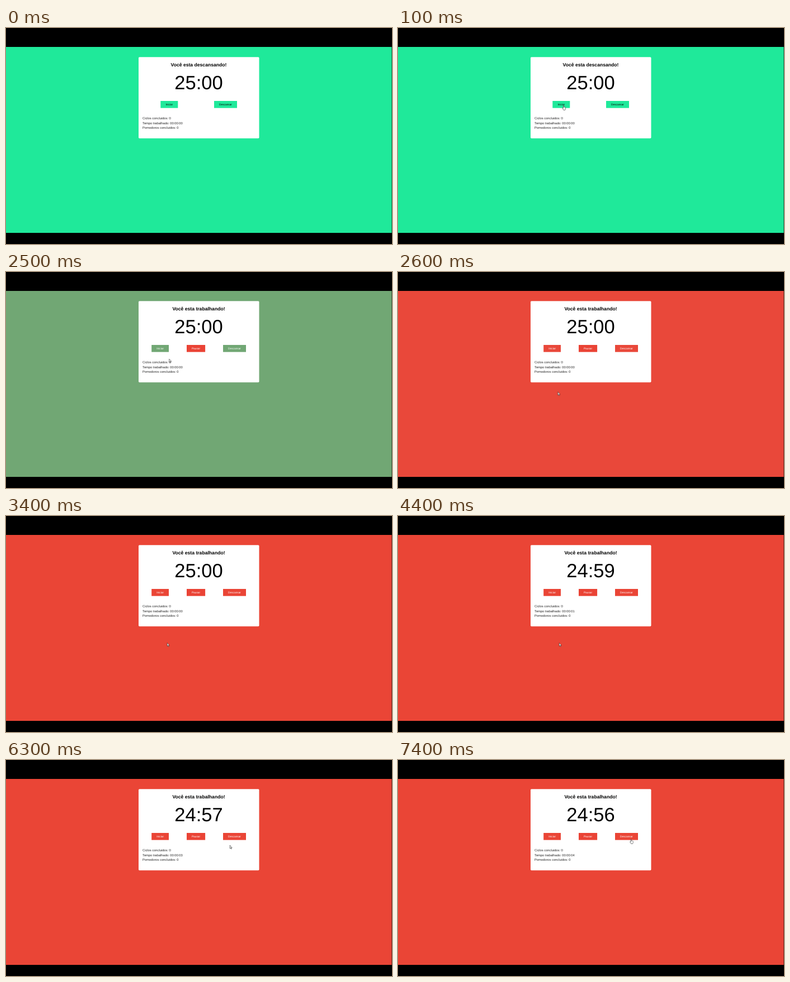
These frames come from a looping animation (690 by 388 pixels, 8 s). An HTML page:

```html
<!DOCTYPE html>
<html lang="pt-BR">
<head>
<meta charset="utf-8">
<title>Pomodoro</title>
<style>
  html, body { margin: 0; width: 100%; height: 100%; overflow: hidden; background: #000; }
  svg { display: block; width: 690px; height: 388px; }
  text { font-family: "Liberation Sans", Arial, sans-serif; text-rendering: geometricPrecision; }
  .mid { text-anchor: middle; }
  .title { font-size: 8.62px; font-weight: bold; }
  .clock { font-size: 34.5px; }
  .stats { font-size: 5.75px; fill: #222; }
  .label { font-size: 4.8px; }
  .work .label { fill: #fff; }
  .red { fill: #ea4335; }

  .theme, .rest, .work, .pointer, .arrow, .hand { animation: theme 8s step-end infinite; }
  .rest { animation-name: rest; }
  .work { animation-name: work; }
  .pointer { animation-name: move; }
  .arrow { animation-name: arrow; }
  .hand { animation-name: hand; }

  @keyframes theme {
    0% { fill: #1fe99a; }
    30% { fill: #29e097; }
    31.25% { fill: #71a774; }
    32.5% { fill: #e9483a; }
    33.75%, 100% { fill: #ea4536; }
  }
  @keyframes rest { 0% { visibility: visible; } 30%, 100% { visibility: hidden; } }
  @keyframes work { 0% { visibility: hidden; } 30%, 100% { visibility: visible; } }
  @keyframes arrow {
    0% { visibility: hidden; }
    30% { visibility: visible; }
    85%, 100% { visibility: hidden; }
  }
  @keyframes hand {
    0% { visibility: hidden; }
    1.25% { visibility: visible; }
    30% { visibility: hidden; }
    85%, 100% { visibility: visible; }
  }
  @keyframes move {
    0% { transform: translate(296px, 139px); }
    31.25% { transform: translate(291.5px, 156px); }
    32.5% { transform: translate(285.6px, 215.2px); }
    33.75% { transform: translate(287px, 225px); }
    35% { transform: translate(288px, 227.7px); }
    70% { transform: translate(292px, 225px); }
    71.25% { transform: translate(303px, 218px); }
    72.5% { transform: translate(318px, 208px); }
    73.75% { transform: translate(336px, 196px); }
    75% { transform: translate(356px, 182px); }
    76.25% { transform: translate(374px, 170px); }
    77.5% { transform: translate(389px, 160px); }
    78.75% { transform: translate(400px, 153px); }
    80% { transform: translate(404px, 150px); }
    81.25% { transform: translate(405px, 149px); }
    82.5% { transform: translate(407px, 147px); }
    83.75% { transform: translate(410px, 145px); }
    85% { transform: translate(414px, 143px); }
    86.25%, 100% { transform: translate(416.7px, 142px); }
  }
</style>
</head>
<body>
<svg viewBox="0 0 690 388">
  <rect class="theme" y="34" width="689.5" height="334"/>
  <rect x="237" y="52.2" width="215.5" height="146" rx="1.6" fill="#fff"/>

  <g class="rest">
    <text class="title mid" x="344.5" y="68.6">Você esta descansando!</text>
    <rect class="theme" x="276.3" y="131" width="31" height="12.7"/>
    <text class="label mid" x="291.8" y="139.1">Iniciar</text>
    <rect class="theme" x="372" y="131" width="41" height="12.7"/>
    <text class="label mid" x="392.5" y="139.1">Descansar</text>
  </g>

  <g class="work">
    <text class="title mid" x="344.5" y="68.6">Você esta trabalhando!</text>
    <rect class="theme" x="260.2" y="131" width="30.8" height="12.7"/>
    <text class="label mid" x="275.6" y="139.1">Iniciar</text>
    <rect class="red" x="323" y="131" width="33.1" height="12.7"/>
    <text class="label mid" x="339.5" y="139.1">Pausar</text>
    <rect class="theme" x="388" y="131" width="41" height="12.7"/>
    <text class="label mid" x="408.5" y="139.1">Descansar</text>
  </g>

  <text class="clock mid" id="clock" x="344.5" y="110">25:00</text>
  <g class="stats">
    <text x="244" y="164.1">Ciclos concluidos: 0</text>
    <text x="244" y="172.8" id="worked">Tempo trabalhado: 00:00:00</text>
    <text x="244" y="181.4">Pomodoros concluidos: 0</text>
  </g>

  <g class="pointer" id="pointer" fill="#fff" stroke="#222" stroke-width=".6" stroke-linejoin="round">
    <path class="arrow" d="M.2 .2V6L1.5 4.8L2.4 6.9L3.3 6.5L2.4 4.5H4.1Z"/>
    <path class="hand" d="M-.6 .6Q0 -.4 .6 .6V3Q1.2 2.6 1.7 3.3Q2.3 2.9 2.7 3.6Q3.5 3.4 3.5 4.3V6.2Q3.2 7.2 2.7 8.4H-.1Q-.7 7.2 -1.9 5.6Q-2.2 4.4 -1.2 4.6L-.6 5.2Z"/>
  </g>
</svg>
<script>
  const clock = document.getElementById("clock");
  const worked = document.getElementById("worked");
  const motion = document.getElementById("pointer").getAnimations()[0];
  const pad = n => String(n).padStart(2, "0");

  function render() {
    const t = (motion.currentTime || 0) % 8000;
    const secs = Math.max(0, Math.floor((t - 2400) / 1000));
    const left = 1500 - secs;
    clock.textContent = pad(Math.floor(left / 60)) + ":" + pad(left % 60);
    worked.textContent = "Tempo trabalhado: 00:00:" + pad(secs);
    requestAnimationFrame(render);
  }
  render();
</script>
</body>
</html>
```
